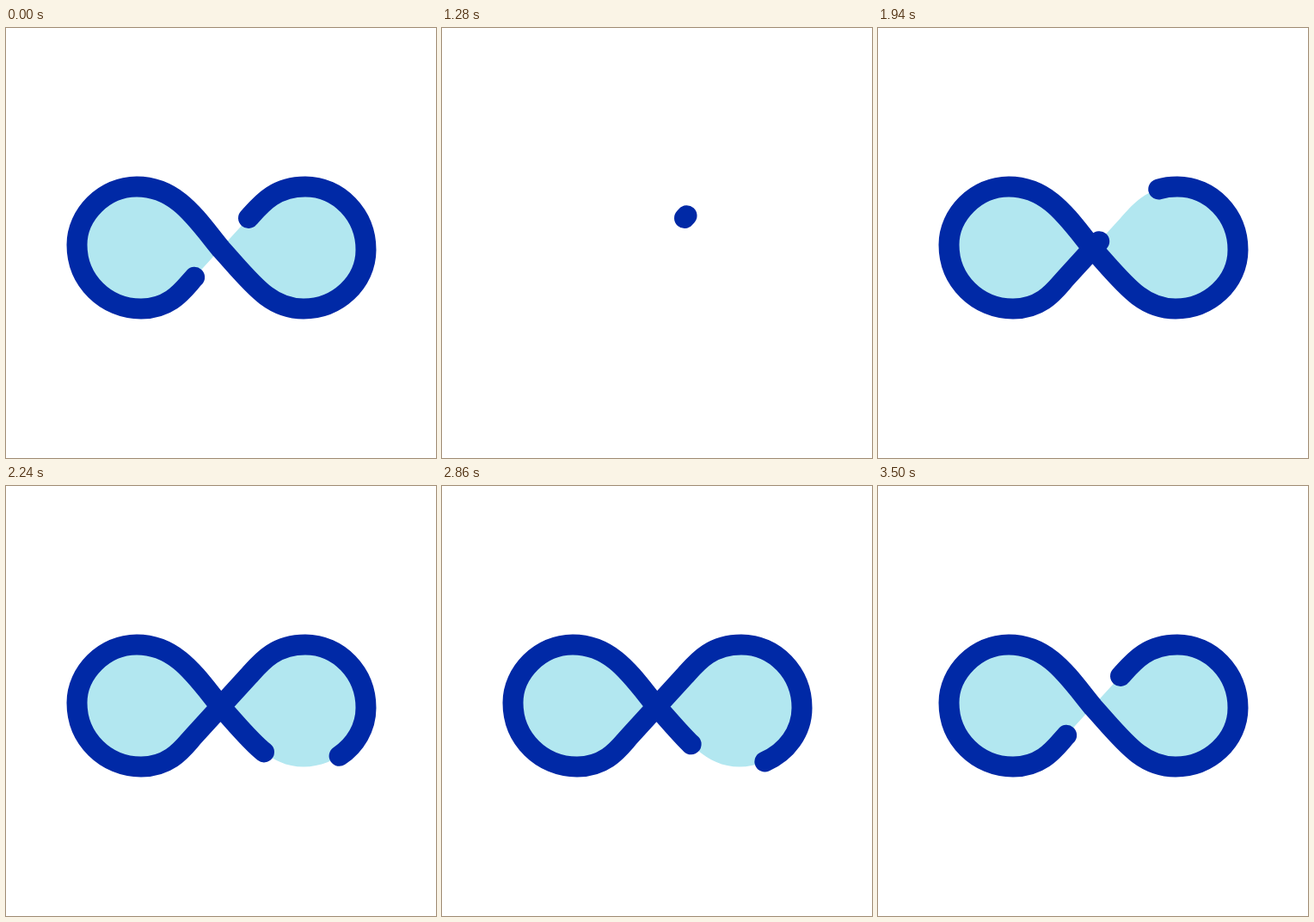
Write an HTML page that moves like this. It is 500 by 500 pixels and loops after 4000 ms.

```html
<!DOCTYPE html>
<html lang="en">
<head>
<meta charset="utf-8">
<title>Infinity loop</title>
<style>
  html, body { margin: 0; width: 100%; height: 100%; overflow: hidden; background: #fff; }
  svg { display: block; width: 500px; height: 500px; }
  #fill { fill: #b2e7f0; }
  #line { fill: none; stroke: #0029a6; stroke-width: 24; stroke-linecap: round; stroke-linejoin: round; }
</style>
</head>
<body>
<svg viewBox="0 0 500 500">
  <path id="fill"/>
  <path id="line"/>
</svg>
<script>
const fill = document.getElementById('fill');
const line = document.getElementById('line');

const LOOP = 4000, STEP = 20;

// Right lobe, the long crossing stroke, left lobe, then the short diagonal back.
const SHAPE = `M282 221
  C296 205.5 312 184.5 348 184.5
  C387 184.5 418.5 217.5 418.5 258
  C418.5 296 385 326.5 346 326.5
  C306 326.5 285 295.5 250 257
  C222 223 199 184.5 152 184.5
  C114 184.5 82.5 217 82.5 252
  C82.5 294 116 326.5 157 326.5
  C192 326.5 207 303 218.5 290.5
  Z`;
fill.setAttribute('d', SHAPE);
line.setAttribute('d', SHAPE);

const TOTAL = line.getTotalLength();
const GAP = Math.hypot(282 - 218.5, 290.5 - 221);
const FULL = TOTAL - GAP;

const ease = (t, from, to) => {
  const u = Math.min(1, Math.max(0, (t - from) / (to - from)));
  return u * u * (3 - 2 * u);
};

function draw(t) {
  const shown = t < 1100 ? 1 - ease(t, 500, 1000) : ease(t, 1260, 1760);
  const start = 2 * TOTAL * ease(t, 1760, 3500) % TOTAL;
  const length = FULL * shown;

  fill.style.opacity = shown;
  line.style.visibility = length > 0.5 ? 'visible' : 'hidden';
  line.style.strokeDasharray = `${length} ${TOTAL - length}`;
  line.style.strokeDashoffset = -start;
}

function tick() {
  const t = performance.now() % LOOP;
  draw(Math.floor(t / STEP) * STEP);
  requestAnimationFrame(tick);
}
tick();
</script>
</body>
</html>
```
